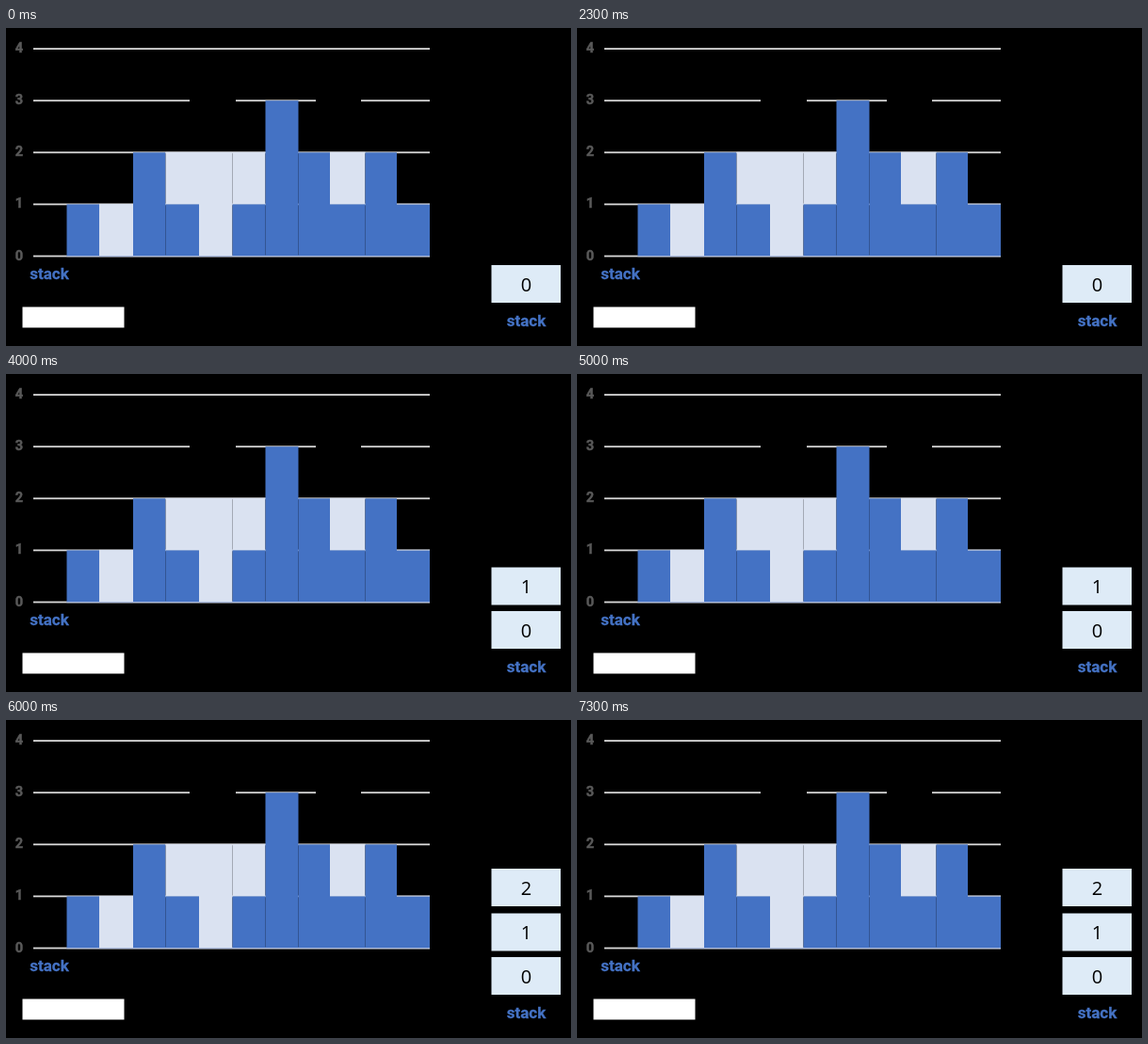
Write an HTML page that moves like this. It is 600 px wide and 338 px high and loops after 8000 ms.

```html
<!DOCTYPE html>
<html>
<head>
<meta charset="utf-8">
<style>
html, body { margin: 0; width: 100%; height: 100%; overflow: hidden; background: #000; }
svg { display: block; }
.axis { font: bold 14.5px Roboto, sans-serif; fill: #595959; stroke: #595959; stroke-width: .5; }
.name { font: bold 17px Roboto, sans-serif; fill: #4472c4; stroke: #4472c4; stroke-width: .3; }
.item { font: 20px "Open Sans", "Noto Sans", sans-serif; fill: #000; }
text { text-anchor: middle; }
</style>
</head>
<body>
<svg id="stage" width="600" height="338" viewBox="0 0 600 338"></svg>
<script>
const LOOP = 8000;
const BLUE = '#4472c4', WATER = '#dae2f1', LINE = '#d9d9d9';
const stage = document.getElementById('stage');

function add(tag, attrs, parent = stage) {
  const el = document.createElementNS('http://www.w3.org/2000/svg', tag);
  for (const k in attrs) el.setAttribute(k, attrs[k]);
  return parent.appendChild(el);
}
const rect = (x, y, x2, y2, fill, parent) =>
  add('rect', { x, y, width: x2 - x, height: y2 - y, fill }, parent);
const label = (x, y, cls, str, parent) => {
  add('text', { x, y, class: cls }, parent).textContent = str;
};
const level = v => 242.5 - 55.1 * v;

// Grid and axis
for (let v = 0; v <= 4; v++) {
  const y = level(v);
  const parts = v === 3 ? [[29, 195], [244, 329], [377, 450]] : [[29, 450]];
  for (const [a, b] of parts) rect(a, y - .9, b, y + .9, LINE);
  label(14, y + 4, 'axis', v);
}

// Bars with the water held above them
const edges = [64.5, 99, 135, 169.5, 205, 240.5, 275.5, 310.5, 344, 381.5, 415, 450];
const heights = [1, 0, 2, 1, 0, 1, 3, 2, 1, 2, 1];
const water = [0, 1, 0, 1, 2, 1, 0, 0, 1, 0, 0];
heights.forEach((h, i) => {
  const a = edges[i], b = edges[i + 1], top = level(h);
  if (water[i]) rect(a, level(h + water[i]) - .5, b, top, WATER);
  if (h) rect(a, top, b, level(0), BLUE);
});
rect(64.5, 242, 450, 243.2, '#a9b9dc');
rect(415, 186.8, 450, 187.6, '#b4c2e0');

label(46, 267, 'name', 'stack');
label(552.5, 317, 'name', 'stack');
rect(17.5, 296.5, 125.5, 318.5, '#fff');

// Stack items, each pushed at its own time
const items = [[0, 252], [3000, 205.5], [6000, 158]].map(([start, y], i) => {
  const g = add('g', {});
  rect(515.5, y, 589, y + 40, '#deebf7', g);
  label(552.5, y + 27.5, 'item', i, g);
  return { g, start };
});

function draw() {
  const t = performance.now() % LOOP;
  for (const { g, start } of items)
    g.setAttribute('visibility', t >= start ? 'visible' : 'hidden');
  requestAnimationFrame(draw);
}
draw();
</script>
</body>
</html>
```
